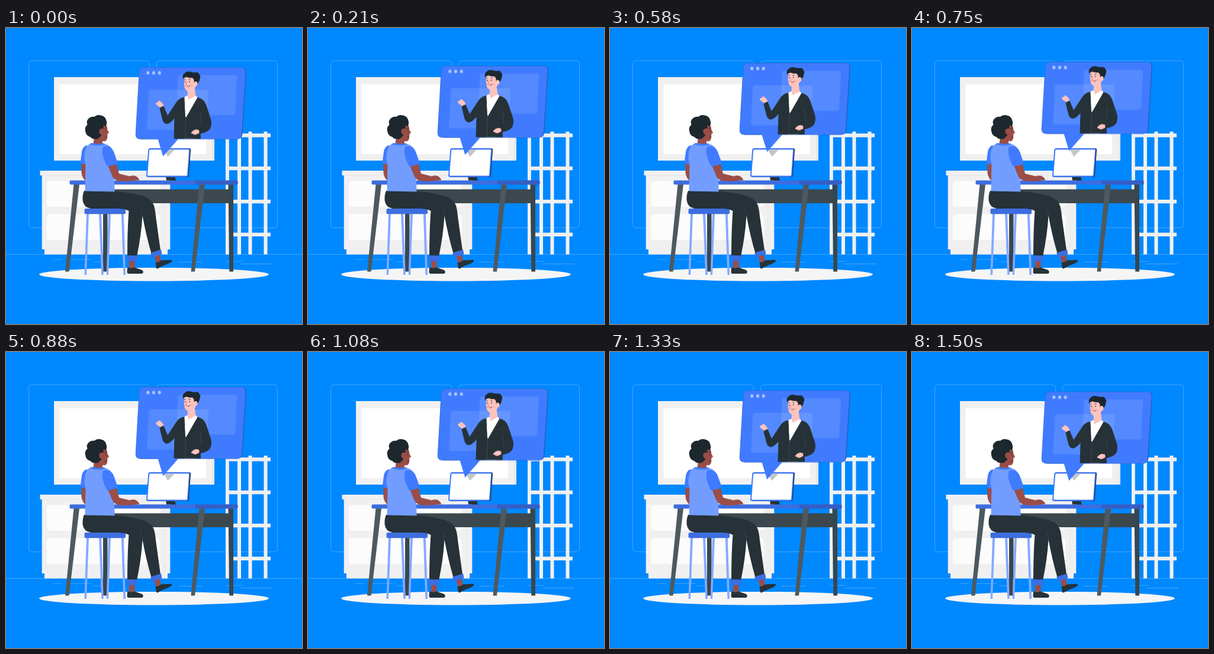
An HTML page that plays this animation: 500x500 px, repeating every 1540 ms.

```html
<!DOCTYPE html>
<html lang="en">
<head>
<meta charset="utf-8">
<title>Video call</title>
<style>
  html, body { margin: 0; width: 100%; height: 100%; overflow: hidden; background: #08f; }
  svg { display: block; width: 100vw; height: 100vh; }
  .call { animation: float 1540ms linear -40ms infinite; }
  @keyframes float {
    50% { transform: translateY(-10px); }
  }
  .line { fill: none; stroke: #fff; stroke-opacity: .32; stroke-width: .8; }
  .pale { fill: #f0f0f0; }
  .shade { fill: #e6e6e6; }
  .white { fill: #fff; }
  .blue { fill: #407bff; }
  .navy { fill: #3d6de0; }
  .light { fill: #729dff; }
  .dark { fill: #263238; }
  .slate { fill: #37474f; }
  .steel { fill: #4d595f; }
  .hair { fill: #1d282e; }
  .brown { fill: #9b4d48; }
  .pink { fill: #ffc3bd; }
</style>
</head>
<body>
<svg viewBox="0 0 500 500">
  <rect width="500" height="500" fill="#08f"/>

  <g class="line">
    <rect x="38.5" y="55.3" width="204" height="282.2" rx="5"/>
    <rect x="254.5" y="55.3" width="204" height="282.2" rx="5"/>
    <path d="M0 382.5H500M80 391H95M108 391H144M147 395H166M290 395.5H331M371 394.3H399M396 398.5H450"/>
  </g>

  <g id="board">
    <rect class="pale" x="81" y="83" width="271" height="141"/>
    <rect class="shade" x="348.5" y="83" width="3.5" height="141"/>
    <rect class="white" x="90.5" y="95" width="247.500" height="118"/>
  </g>

  <g id="shelf">
    <path class="pale" d="M371 178h5.800v204.500h-5.800zM391 178h6v204.500h-6zM409.500 175h6v207.500h-6zM435.500 175h6v207.500h-6z"/>
    <path class="pale" d="M371 178.200h76v6.300h-76zM371 234h76v6.200h-76zM371 290h76v6.200h-76zM371 345.800h76v6.200h-76z"/>
    <path class="shade" d="M435.500 184.500h6v2h-6zM435.500 240.200h6v2h-6zM435.500 296.200h6v2h-6zM435.500 352h6v2h-6z"/>
  </g>

  <g id="cabinet">
    <rect class="pale" x="65" y="372" width="208" height="10.500"/>
    <rect class="pale" x="60.700" y="247" width="216.600" height="127"/>
    <rect class="shade" x="266.500" y="249" width="1" height="125"/>
    <rect class="pale" x="57.500" y="241" width="223" height="8"/>
    <path class="shade" d="M60.700 248.500H277V249.500H60.700z"/>
    <rect x="68.700" y="258.500" width="191" height="43.500" rx="5" fill="#fcfcfc"/>
    <rect x="68.700" y="314.500" width="191" height="43.500" rx="5" fill="#fcfcfc"/>
  </g>

  <ellipse cx="250" cy="416.200" rx="194" ry="11.300" fill="#f5f5f5"/>

  <g id="desk">
    <rect class="slate" x="164" y="264" width="7.500" height="147.500"/>
    <rect x="168" y="272.500" width="210" height="23.500" fill="#3c484e"/>
    <path class="slate" d="M375.500 264H384V411.500H377.300z"/>
    <path class="steel" d="M114.500 264H124L106.500 411.500H100zM326.500 264H336L319 411.500H312.500z"/>
    <rect class="navy" x="107.500" y="257.500" width="284" height="7" rx="2"/>
    <path fill="#355fc6" d="M320 257.500H389.500Q391.500 257.500 391.500 259.500V262.500Q391.500 264.500 389.500 264.500H320z"/>
  </g>

  <g id="monitor">
    <path class="dark" d="M270 250.500H285L287 257.500H271z"/>
    <path fill="#22314f" d="M243 203.300H310Q312.300 203.300 312.100 206L308.700 249.500Q308.500 252 306 252H240z"/>
    <path class="blue" d="M243 203.300H308.500Q310.800 203.300 310.600 206L307.600 249.300Q307.400 251.700 305 251.700H239Q236.800 251.700 237 249.300L240.200 206Q240.400 203.300 243 203.300z"/>
    <path class="white" d="M243.500 205.500H308Q309.200 205.500 309.100 206.800L306 248.500Q305.900 249.600 304.800 249.600H240.200Q239 249.600 239.100 248.500L242.200 206.800Q242.300 205.500 243.500 205.500z"/>
    <path fill="#c3c5c9" d="M267 205.500H285L273.300 217.500z"/>
  </g>

  <g id="stool">
    <path fill="#85a9ff" d="M136 313H140L136 417H132.500zM157 313H161L164.800 417H161.200zM173 313H177L173 417H169.700zM194.800 313H198.800L202 417H198.400z"/>
    <rect class="navy" x="132.500" y="305" width="69.500" height="9.300" rx="2.500"/>
  </g>

  <g id="pupil">
    <path class="brown" d="M127 227L135 229L134.500 258Q129 254 127.500 245z"/>
    <path class="blue" d="M137 198Q130 199 128 209L125.700 227Q129 231 135 230.500z"/>

    <path class="brown" d="M250 384L259.500 381L262 394L254 398zM207.500 392H217.500V405H208z"/>
    <path class="dark" d="M252.500 396Q257 396.500 262 392.500L278.500 391.700Q281.500 393 279 395.300Q275 398.500 268 400.500Q262 402.500 258 405.500Q254.500 407.500 253.700 405zM205 404.500Q211 406 217.500 404.500L229.500 408.800Q232.500 410.500 231.500 413.500Q231 415 228 415H207Q204.500 415 204.500 412z"/>
    <path class="dark" d="M132 275L185 275.500Q210 278 232 284Q246 289 250 300Q252 307 253 318L261 376L245.500 380.500Q237 352 230.500 317Q228.500 350 221 386H205Q205 340 207.500 309Q202 305.500 190 305H143Q131 303 129.500 291Q129 281 132 275z"/>
    <path fill="none" stroke="#46535a" stroke-width=".6" d="M230.500 317Q230 309 227 303"/>
    <path class="navy" d="M244 379.800L262 374.300L263.500 382L247 388zM204.500 384L222 384.500L221 394H205z"/>

    <path class="light" d="M141 196Q155 192.500 168 196Q179 199 182 211L183.500 276.500L133.500 275.500L134.500 230Q129 216 137 199z"/>
    <path class="brown" d="M149 183H163V196.500Q155 200 147.500 195.500z"/>
    <path class="blue" d="M141 196Q144 193.500 148 194.500Q156 197 164 194.500L168 196.300Q155 201.500 141 196z"/>
    <path class="brown" d="M172 232L186.500 229L191 246Q201 248.500 209 250.500Q214 248.500 219 250Q224 252.500 225.300 257L210 258.500Q197 260 187 257.500Q181 254.500 179 249z"/>
    <path class="blue" d="M165 199.500Q178 198.500 182 209L189 228.500Q182 232.500 171 234Q163 220 162.500 208Q162.500 203 165 199.500z"/>

    <path class="brown" d="M157 166Q163 160 169.500 164Q171.500 169 171.300 172L174 176.500Q173.500 178.500 171.500 178.500L171 186Q170 191.500 165 191.500L160 189.500Q153 184 157 166z"/>
    <path class="hair" d="M168.500 153.500Q172 162 168 166.500Q166 164 164.500 164.500L164.800 170Q162.500 169 160 170.500Q156 173 158.500 178.500L161.500 181L155.500 187Q146 189 142.500 184Q135 182 134 174Q132.500 167 137.500 163.500Q135 157 139.500 153Q143.500 149 149 150Q154 145.500 160 147.500Q166 148.500 168.500 153.500z"/>
    <ellipse class="brown" cx="160.500" cy="174.500" rx="3" ry="4"/>
    <ellipse class="hair" cx="168.500" cy="173.300" rx=".7" ry="1.100"/>
    <path fill="none" stroke="#1d282e" stroke-width=".9" d="M166.500 169.800L170 168.700M167.500 184.500Q169 185 170.500 183.800"/>
  </g>

  <g class="call">
    <path fill="#3157b5" d="M233 67.100H398Q406.200 67.500 405.800 75.500L399.300 180Q398.500 188.400 391 188.400H227z"/>
    <path class="blue" d="M233 67.300H397Q405 67.500 404.600 75.500L398 180Q397.200 188.300 390 188.300H291L265.300 217.500L256.500 188.300H226.500Q218.700 188 219 180L225 75Q225.500 67.500 233 67.300z"/>
    <path fill="none" stroke="#3565d2" stroke-width=".7" d="M256.500 188H226.500Q218.900 188 219.200 180L225.200 75Q225.700 67.600 233 67.500H397"/>
    <g fill="#fff">
      <g opacity=".55">
        <ellipse cx="239.700" cy="76.600" rx="2.600" ry="3"/>
        <ellipse cx="249.500" cy="76.600" rx="2.600" ry="3"/>
        <ellipse cx="259.200" cy="76.600" rx="2.600" ry="3"/>
      </g>
      <path opacity=".1" d="M245 105H339.500Q342.500 105 342.300 108L339.300 169Q339 172.700 335.500 172.700H241.500Q238 172.500 238.200 169L241.300 108.500Q241.600 105 245 105z"/>
      <path opacity=".1" d="M294 80.200H387Q390.300 80.200 390.200 83.500L387.200 144Q387 147.800 383.500 147.800H291Q288 147.500 288.200 144L290.400 83.500Q290.700 80.200 294 80.200z"/>
    </g>

    <path class="pink" d="M265.500 135.500L260.500 134.500Q254 131.500 253 128Q253.500 125.500 257 126L257.500 123.500Q260 123 263 126.500Q266.500 129.500 266.300 133z"/>
    <path class="white" d="M302 118L308 114H319L324 119L318 188H300z"/>
    <path class="pink" d="M307 104H319L320.500 116Q316 122.500 309 122.500L306.500 117z"/>
    <path class="dark" d="M301.500 117.500Q293 118.500 288.500 125L273 148.500L266.300 132.500Q262.500 133 259.500 136.500L264.500 156.500Q267 163.500 273 162.500Q278 161 284.500 153.500L283.500 187.800H329L328.700 178.500Q340 176 345 170Q348 164 346.500 156L338 130Q334 120 323 117.500L303 152z"/>
    <path class="white" d="M301.500 117.500Q303 115.500 306.500 115.300L308.500 122L320.500 115.300L323.500 118L304 152Q302 135 301.500 117.500z"/>
    <path fill="none" stroke="#4b585f" stroke-width=".6" d="M303.500 151L302.500 187.500M328.800 144L330.500 168"/>
    <path class="dark" d="M329.500 143L333.500 158L329 168L323 171L326 179.500Q340 178 345.500 170L338 140z"/>
    <path class="pink" d="M326 173L320.500 172Q315.500 173.500 313 177Q312.500 179.500 315.500 179.300Q318 181.800 321.500 180.500L326.500 178z"/>

    <path class="pink" d="M301 86Q306 80 317 83Q323 90 320.500 99Q318 108 310.500 108.300Q303.500 108 301.500 101Q300 93 301 86z"/>
    <path class="hair" d="M299 87Q297.500 79 301.500 77.500Q304.500 73 311.500 74.500Q316 76.500 321 75.500Q326 75.500 326 78.500Q329.500 81 327.500 86Q327 91 323.500 95L319 98L317.500 91.500Q318.500 88 314.500 84.800Q309 85.500 305 83.500Q301.500 83.500 299 87z"/>
    <ellipse class="pink" cx="320.500" cy="95" rx="3" ry="4"/>
    <ellipse cx="303.500" cy="98.300" rx="1.800" ry="1.500" fill="#ff9b95"/>
    <ellipse cx="313.500" cy="98" rx="2" ry="1.500" fill="#ffaca5"/>
    <ellipse class="hair" cx="302.900" cy="92" rx=".8" ry="1.100"/>
    <ellipse class="hair" cx="309.800" cy="91.500" rx=".8" ry="1.100"/>
    <path fill="none" stroke="#263238" stroke-width=".8" stroke-linecap="round" d="M301 88.700L303.500 87.700M308.500 87.500L311.500 88M306.500 99.300Q309 101.300 311 98"/>
    <path fill="none" stroke="#e57f78" stroke-width=".8" d="M305.500 91.500L304.200 96.500L306 96.800"/>
  </g>
</svg>
</body>
</html>
```
